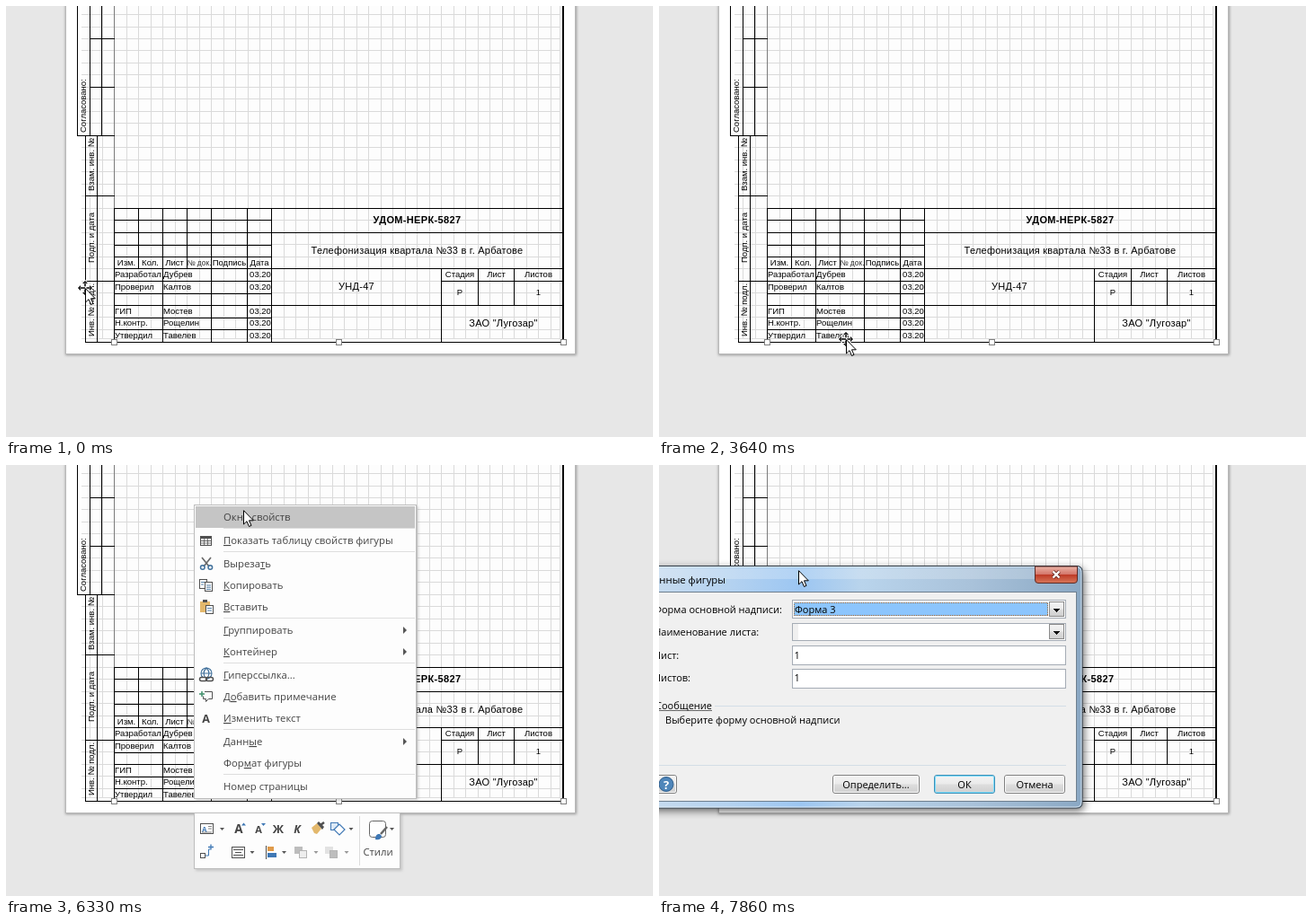
Recreate the animation shown at these times as an HTML page. Size 720x480 px, loop 8 s.

```html
<!DOCTYPE html>
<html lang="ru">
<head>
<meta charset="utf-8">
<title>Штамп чертежа</title>
<style>
html, body { margin: 0; width: 100%; height: 100%; overflow: hidden; background: #e7e7e7; }
svg { position: absolute; left: 0; top: 0; width: 720px; height: 480px; overflow: visible; }
text { white-space: pre; }
.doc { font-family: "Liberation Sans", Arial, sans-serif; fill: #000; }
.ui { font-family: "Open Sans", "Noto Sans", sans-serif; }
.crisp { shape-rendering: crispEdges; }
#dialog { transform-origin: 230px 247px; }
</style>
</head>
<body>
<svg id="sheet"></svg>
<svg id="menu"></svg>
<svg id="dialog"></svg>
<svg id="pointer"></svg>
<script>
const $ = id => document.getElementById(id);
const text = (x, y, s, size, more = '') => `<text x="${x}" y="${y}" font-size="${size}" ${more}>${s}</text>`;
const rect = (x, y, w, h, fill, more = '') => `<rect x="${x}" y="${y}" width="${w}" height="${h}" fill="${fill}" ${more}/>`;
const path = (d, fill, more = '') => `<path d="${d}" fill="${fill}" ${more}/>`;
const stroke = (d, color, width = 1, more = '') => path(d, 'none', `stroke="${color}" stroke-width="${width}" ${more}`);
const H = (y, a, b) => `M${a} ${y + .5}H${b}`;
const V = (x, a, b) => `M${x + .5} ${a}V${b}`;
const MID = 'text-anchor="middle"';

function sheet() {
  const step = 13.48;
  let grid = '';
  for (let x = 633 - step * 2; x > 84; x -= step) grid += V(Math.floor(x), 0, 370);
  for (let y = 387 - step * 2; y > 0; y -= step) grid += H(Math.floor(y), 84, 616);

  const side = V(79, 0, 145) + V(93, 0, 145) + V(106, 0, 145) + H(36, 93, 121) + H(90, 93, 121) + H(144, 79, 121)
    + V(88, 144, 375) + V(101, 144, 375) + H(211, 88, 121) + H(306, 88, 121);
  let table = H(225, 120, 620) + H(374, 88, 620) + V(120, 225, 375);
  for (const y of [238, 252, 266, 279, 292, 306, 320, 333, 347, 360]) table += H(y, 121, 296);
  for (const x of [147, 201]) table += V(x, 225, 293);
  for (const x of [174, 228, 268, 295]) table += V(x, 225, 375);
  for (const y of [252, 292, 333]) table += H(y, 296, 620);
  table += H(306, 485, 620) + V(484, 292, 375) + V(525, 292, 334) + V(565, 292, 334);

  const small = (x, y, s, more) => text(x, y, s, 9.5, more);
  const up = (x, y, s) => small(0, 0, s, `transform="translate(${x} ${y}) rotate(-90)"`);
  const people = [
    ['Разработал', 'Дубрев', 302], ['Проверил', 'Калтов', 316], ['ГИП', 'Мостев', 343],
    ['Н.контр.', 'Рощелин', 356], ['Утвердил', 'Тавелев', 370]
  ];
  const heads = [['Изм.', 134], ['Кол.', 160.5], ['Лист', 187.5], ['Подпись', 248.5], ['Дата', 282]];
  const cells = [['Стадия', 505, 302], ['Лист', 545.5, 302], ['Листов', 592.5, 302], ['Р', 505, 322], ['1', 592.5, 322]];

  return `<filter id="soft"><feGaussianBlur stdDeviation="1.6"/></filter>`
    + rect(66, -20, 569, 409, '#999', 'filter="url(#soft)"')
    + rect(66, -20, 568, 408, '#b9b9b9') + rect(67, -20, 566, 407, '#fff')
    + rect(84, 0, 532, 370, '#fdfdfd')
    + `<g class="crisp">` + stroke(grid, '#dadada') + stroke(V(616, 0, 371) + H(370, 84, 617), '#dcdcdc')
    + stroke(V(120, 0, 225), '#7c7c7c') + stroke(side + table, '#000') + rect(619, 0, 2, 375, '#000') + `</g>`
    + `<g class="doc">`
    + up(89, 141, 'Согласовано:') + up(97.5, 206, 'Взам. инв. №') + up(97.5, 286, 'Подп. и дата') + up(97.5, 368, 'Инв. № подл.')
    + heads.map(([s, x]) => small(x, 289, s, MID)).join('')
    + text(215, 289, '№ док.', 8.5, MID + ' fill="#333"')
    + people.map(([role, name, y]) => small(121, y, role) + small(175, y, name) + small(283, y, '03.20', MID)).join('')
    + cells.map(([s, x, y]) => small(x, y, s, MID)).join('')
    + text(457.5, 242, 'УДОМ-НЕРК-5827', 11, MID + ' font-weight="700" letter-spacing=".35"')
    + text(457.5, 276, 'Телефонизация квартала №33 в г. Арбатове', 11, MID + ' letter-spacing=".23"')
    + text(390, 316, 'УНД-47', 11, MID + ' letter-spacing=".3"')
    + text(553.5, 357, 'ЗАО "Лугозар"', 11, MID + ' letter-spacing=".25"')
    + `</g><g class="crisp">`
    + [118, 368, 618].map(x => rect(x - .5, 371.5, 6, 6, '#fff', 'stroke="#7f7f7f"')).join('') + `</g>`;
}

const ITEMS = [
  [58, 'Окно свойств'], [84, '_Показать таблицу свойств фигуры'], [110, 'Выреза_ть'], [134, '_Копировать'],
  [158, '_Вставить'], [184, '_Группировать'], [208, '_Контейнер'], [234, '_Гиперссылка...'],
  [258, 'Д_обавить примечание'], [282, '_Изменить текст'], [308, 'Данн_ые'], [332, 'Фор_мат фигуры'], [358, 'Номер страницы']
];
const accel = s => s.replace(/_(.)/, '<tspan text-decoration="underline">$1</tspan>');
const caret = (x, y, c = '#555') => path(`M${x - 2.5} ${y - 1}h5l-2.5 3z`, c);

function menuIcons() {
  const blue = '#41719c', dark = '#505050', tan = '#e3b86c';
  return rect(216.5, 79.5, 12, 10, '#fff', `stroke="${dark}"`) + rect(216, 79, 13, 3, dark)
    + stroke('M217 84.5h12M217 87h12M220.5 82v8M224.5 82v8', dark, .8)
    // scissors
    + stroke('M218 103L226 113M228 103L220 113', '#6a6a6a', 1.7)
    + stroke('M216.5 114a2.3 2.3 0 1 0 4.6 0a2.3 2.3 0 1 0-4.6 0M225 114a2.3 2.3 0 1 0 4.6 0a2.3 2.3 0 1 0-4.6 0', blue, 1.5)
    // copy, paste
    + rect(215.5, 127.5, 8, 10, '#fff', `stroke="${dark}"`) + rect(221.5, 130.5, 8, 10, '#fff', `stroke="${dark}"`)
    + stroke('M217 130.5h4M217 133h3M223 134h5M223 136.2h5M223 138.4h5', blue, .9)
    + rect(216, 152, 11, 12, tan) + rect(219, 150, 5, 3, dark) + rect(222.5, 156.5, 8, 9, '#fff', `stroke="${dark}"`)
    + stroke('M224 159.5h5M224 162h5', blue, .9)
    // globe with chain
    + stroke('M217 232a6 6 0 1 1 12 0a6 6 0 1 1-12 0M217 232h12M223 226c-4 4-4 8 0 12c4-4 4-8 0-12', blue, 1.1)
    + rect(215.5, 236.5, 8, 4, '#fff', `rx="2" stroke="${dark}" stroke-width="1.5"`)
    + rect(222.5, 236.5, 8, 4, 'none', `rx="2" stroke="${dark}" stroke-width="1.5"`)
    // comment
    + stroke('M221 252.5h8.500v8h-4l-3 3v-3h-3v-3', dark) + stroke('M215 255h6M218 252v6', '#3f8f6b', 1.5)
    + text(222.5, 286.5, 'A', 12.5, MID + ' font-weight="700" fill="#444"');
}

function miniBar() {
  const blue = '#3f78b5', dark = '#505050';
  const bold = (x, y, s, size, more = '') => text(x, y, s, size, `${MID} font-weight="700" fill="#444" ${more}`);
  const stack = (x, c1, c2) => rect(x, 425, 9, 8, c1) + rect(x + 5.5, 429.5, 8, 8, c2, 'stroke="#b5b5b5"');
  return rect(216.5, 399.500, 14, 11, '#fff', `stroke="${dark}"`) + text(218, 408.5, 'A', 8, `font-weight="700" fill="${blue}"`)
    + stroke('M225 402.500h4M225 405h4M218 409h11', '#777', .9)
    + bold(259, 410, 'A', 13.5) + path('M262 401.5h5l-2.500-3z', blue)
    + bold(281, 410, 'A', 11) + path('M284 399h5l-2.500 3z', blue)
    + bold(303, 409.5, 'Ж', 13) + bold(324, 409.5, 'К', 12.5, 'font-style="italic"')
    // brush
    + path('M340 404l6-5l5 6l-5 6l-3-1z', '#e3b86c') + path('M346 399l2-2l6 6l-2 3z', dark) + stroke('M350 401l4-3', dark, 2.5)
    // shapes
    + rect(361.5, 398.5, 8, 8, '#dbe9f7', `stroke="${blue}"`) + path('M365 406l6-6l6 6l-6 6z', '#fff', `stroke="${blue}" stroke-width="1.2"`)
    + caret(240.5, 405) + caret(384, 405)
    + stroke(V(393, 391, 446), '#dcdcdc')
    + rect(404.5, 396.5, 18, 18, '#fff', 'rx="3" stroke="#666"') + path('M411 417c0-6 3-6 5-6l2 2c0 4-4 5-7 4z', blue)
    + stroke('M417 411l7-8', '#666', 2.5) + caret(429.5, 405)
    + text(414, 435, 'Стили', 11.3, MID + ' fill="#444"')
    // connector
    + rect(216.5, 432.5, 5, 5, '#fff', `stroke="${dark}"`) + stroke('M222 435h3.500v-7h2', blue) + stroke('M225 425.500h6M228 422.500v6', blue, 1.3)
    // alignment
    + rect(251.5, 425.5, 14, 12, '#fff', `stroke="${dark}"`) + stroke('M253 428.500h11M255 431.500h7M253 434.500h11', dark)
    + caret(274, 431)
    + stroke(V(289, 424, 439), dark) + rect(291, 425, 7, 5, '#e09a4a') + rect(291, 432, 10, 5, blue) + caret(309.5, 431)
    + stack(321, '#bdbdbd', '#eee') + caret(345, 431, '#999') + stack(355, '#e2e2e2', '#bdbdbd') + caret(379, 431, '#999');
}

function menu() {
  const shade = 'filter="url(#soft)" opacity=".35"';
  return rect(211, 46, 248, 328, '#888', shade) + rect(211, 389, 230, 63, '#888', shade)
    + `<g class="crisp">` + rect(209.5, 44.5, 247, 327, '#fdfdfd', 'stroke="#bdbdbd"')
    + rect(209.5, 387.5, 229, 62, '#fdfdfd', 'stroke="#bdbdbd"')
    + stroke([70, 96, 170, 220, 294, 344].map(y => H(y, 242, 455)).join(''), '#dedede')
    + rect(211, 46, 244, 24, '#c5c5c5', 'id="hover"') + `</g>`
    + `<g class="ui">`
    + ITEMS.map(([y, s]) => text(242, y + 4, accel(s), 11.3, 'fill="#444"')).join('')
    + [184, 208, 308].map(y => path(`M442 ${y - 4}l4 4l-4 4z`, '#555')).join('')
    + menuIcons() + miniBar() + `</g>`;
}

function dialog() {
  const gradient = (id, stops, dir) => `<linearGradient id="${id}" ${dir}>`
    + stops.map(([at, c]) => `<stop offset="${at}" stop-color="${c}"/>`).join('') + `</linearGradient>`;
  const down = 'x2="0" y2="1"';
  const field = (y, h) => rect(148.5, y, 304, h, '#fff', 'stroke="#a5acb5"');
  const combo = y => rect(434.5, y, 16, 16, 'url(#face)', 'stroke="#8a8a8a"') + path(`M438 ${y + 7}h9l-4.500 4.500z`, '#111');
  const button = (x, w, s, edge = '#808080') => rect(x + .5, 345.5, w - 1, 20, 'url(#face)', `rx="2.5" stroke="${edge}"`)
    + rect(x + 1.5, 346.5, w - 3, 18, 'none', `rx="1.5" stroke="${edge === '#808080' ? '#fbfbfb' : '#7fdcfa'}"`)
    + text(x + w / 2, 360, s, 11, MID);
  const labels = [['Форма основной надписи:', 164.5], ['Наименование листа:', 190], ['Лист:', 215.5], ['Листов:', 241]];
  const area = 'M-20 112.500H465q6 0 6 6V376q0 6-6 6H-20z';

  return gradient('glass', [[0, '#c9dcee'], [.2, '#b4d2f0'], [.36, '#9cc6f2'], [.5, '#b9d4ec'], [.75, '#a9c2da'], [1, '#8aa8c4']], '')
    + gradient('shine', [[0, '#fff'], [.45, '#fff'], [1, '#fff']], down)
    + gradient('face', [[0, '#f4f4f4'], [.48, '#ebebeb'], [.52, '#dddddd'], [1, '#cfcfcf']], down)
    + gradient('red', [[0, '#eab3a6'], [.47, '#d4766a'], [.5, '#bd3a26'], [1, '#d8775a']], down)
    + `<filter id="cast" x="-20%" y="-20%" width="140%" height="140%"><feGaussianBlur stdDeviation="5"/></filter>`
    + path(area, '#000', 'filter="url(#cast)" opacity=".6" transform="translate(2 3)"')
    + path(area, 'url(#glass)', 'stroke="#2f3b46"')
    + stroke('M-20 113.500H464q6 0 6 6V375q0 6-6 6H-20', '#e9f3fb', 1, 'opacity=".8"')
    + rect(-20, 115, 438, 12, 'url(#shine)', 'opacity=".22"')
    + rect(-20, 141.5, 484.5, 233, '#f0f0f0', 'stroke="#6e7f8f"')
    + path('M418.500 113H465.500V128q0 3.500-3.500 3.500H422q-3.500 0-3.500-3.500z', 'url(#red)', 'stroke="#5b2a26"')
    + stroke('M438.500 118.500l7 7M445.500 118.500l-7 7', '#6a2c25', 4) + stroke('M438.500 118.500l7 7M445.500 118.500l-7 7', '#fff', 2.4)
    + `<g class="ui" fill="#000">` + text(74, 131.5, 'Данные фигуры', 11.3, 'text-anchor="end"')
    + labels.map(([s, y]) => text(-5.8, y, s, 11)).join('')
    + `<g class="crisp">` + field(150.5, 20) + field(176.5, 19) + field(201.5, 21) + field(227.5, 21)
    + rect(150, 153, 283, 15, '#8cc5fd') + rect(150.5, 153.5, 282, 14, 'none', 'stroke="#a4662c" stroke-dasharray="1 1"')
    + rect(149, 177, 6, 18, '#f0f0f0') + combo(152.5) + combo(177.5) + `</g>`
    + text(151, 164.5, 'Форма 3', 11) + text(150.5, 215.5, '1', 11) + text(150.5, 241, '1', 11)
    + text(-4, 272, 'Сообщение', 11) + stroke(H(273, -4, 59), '#444', .8)
    + stroke(H(268, 62, 453) + H(334, -20, 453), '#d3dde6')
    + text(7, 288, 'Выберите форму основной надписи', 11)
    + button(-3, 23, '') + `<circle cx="8" cy="355.500" r="8" fill="#4f86ba" stroke="#2d5c8a"/>`
    + text(8, 360.5, '?', 13, MID + ' font-weight="700" style="fill:#fff"')
    + button(193, 97, 'Определить...') + button(306, 68, 'ОК', '#3a8fb7') + button(384, 68, 'Отмена')
    + `</g>`;
}

function pointer() {
  const head = 'M0-8L-3-5H3z', arms = [0, 90, 180, 270];
  const cross = arms.map(a => `<g transform="rotate(${a})">${path(head + 'M-.75-5.500H.75V0H-.75z', '#000', 'stroke="#fff" stroke-width="1.6" paint-order="stroke"')}</g>`).join('');
  return `<g id="cursor"><g id="move">${cross}</g>`
    + path('M.5.7V16L4 12.700L6.500 18.500L9 17.400L6.500 11.800H11.300z', '#fff', 'stroke="#000" stroke-linejoin="round"') + `</g>`;
}

$('sheet').innerHTML = sheet();
$('menu').innerHTML = menu();
$('dialog').innerHTML = dialog();
$('pointer').innerHTML = pointer();

const LOOP = 8000;
// time, x, y
const PATH = [
  [0, 88, 314], [150, 122, 258], [280, 190, 160], [410, 262, 92], [550, 287, 99],
  [850, 390, 75], [1000, 476, 99],
  [1310, 520, 112], [1445, 580, 150], [1580, 627, 215], [1715, 639, 290], [1850, 600, 365], [1985, 510, 420], [2120, 417, 434],
  [2400, 355, 430], [2520, 322, 428], [2660, 294, 422], [2800, 268, 414], [2940, 246, 404], [3080, 229, 394], [3220, 216, 384], [3360, 209, 377],
  [3480, 208, 373], [3640, 208, 371],
  [5320, 214, 335], [5440, 228, 250], [5560, 245, 150], [5680, 258, 80], [5920, 264, 48], [6330, 264, 50],
  [7100, 280, 90], [7220, 318, 200], [7500, 350, 315], [7620, 360, 345], [7740, 262, 225], [7860, 155, 117]
];
// time, opacity, transform
const OPENING = [
  [0, 0, 'none'],
  [6740, .62, 'translateY(-3px) perspective(1500px) rotateX(-7deg) scale(.962)'],
  [6860, .93, 'perspective(1500px) rotateX(-1deg) scale(.992)'],
  [6980, 1, 'none']
];
const at = (table, t) => table.findLast(row => row[0] <= t);
const show = (id, on) => { $(id).style.visibility = on ? 'visible' : 'hidden'; };

function draw() {
  const t = performance.now() % LOOP;
  const [, x, y] = at(PATH, t);
  $('cursor').setAttribute('transform', `translate(${x} ${y})`);
  show('move', t < 150 || (t >= 3480 && t < 4760));

  const open = t >= 4760 && t < 6620;
  show('menu', open);
  const row = x > 210 && ITEMS.find(([cy]) => Math.abs(cy - y) <= 12);
  show('hover', open && row);
  if (row) $('hover').setAttribute('y', row[0] - 12);

  const [, opacity, transform] = at(OPENING, t);
  $('dialog').style.opacity = opacity;
  $('dialog').style.transform = transform;
  requestAnimationFrame(draw);
}
draw();
</script>
</body>
</html>
```
